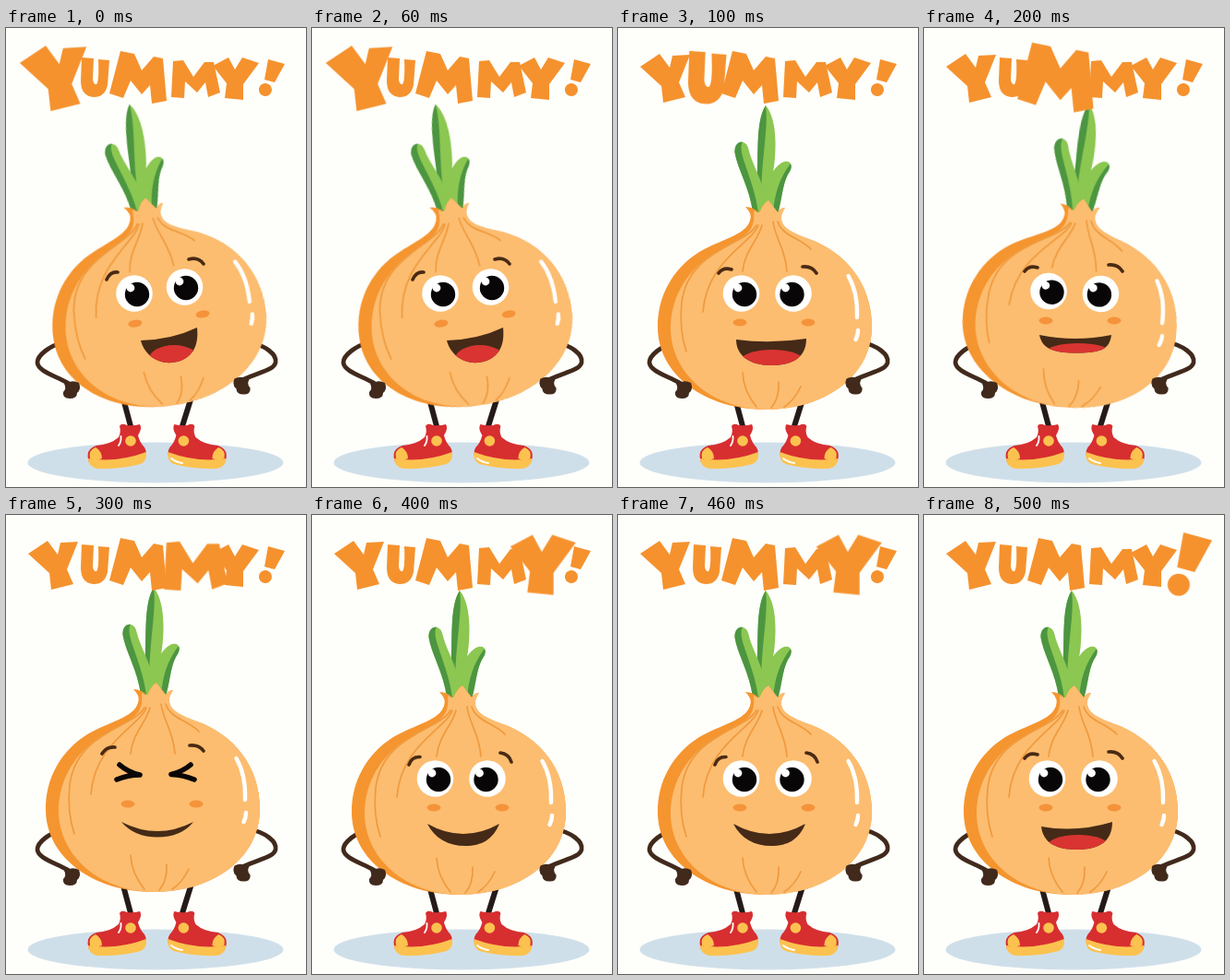
Recreate the animation shown at these times as an HTML page. Size 325 by 498 pixels, loop 0.6 s.

```html
<!DOCTYPE html>
<html lang="en">
<head>
<meta charset="utf-8">
<title>Yummy!</title>
<style>
  html, body { margin: 0; width: 100%; height: 100%; overflow: hidden; background: #fefefa; }
  svg { display: block; width: 100%; height: 100%; }

  .title { fill: #f5922e; }
  .title path { animation: pop 600ms step-end infinite; transform-origin: var(--o); }
  .face { visibility: hidden; animation: show 600ms step-end infinite; }
  .t1 { animation-delay: -500ms !important; }
  .t2 { animation-delay: -400ms !important; }
  .t3 { animation-delay: -300ms !important; }
  .t4 { animation-delay: -200ms !important; }
  .t5 { animation-delay: -100ms !important; }
  @keyframes pop { 0% { transform: scale(var(--s, 1.34)); } 16.66%, 100% { transform: none; } }
  @keyframes show { 0% { visibility: visible; } 16.66%, 100% { visibility: hidden; } }

  .onion { transform-origin: 160px 270px; animation: sway 600ms step-end infinite; }
  @keyframes sway {
    0% { transform: translateY(-1px) rotate(-8deg); }
    16.66% { transform: translateY(2px); }
    33.33% { transform: translateX(3px) rotate(4.8deg); }
    50% { transform: translateY(-3px); }
    66.66%, 100% { transform: none; }
  }

  .line { fill: none; stroke-linecap: round; stroke-linejoin: round; }
  .seam { stroke: #f09a3e; stroke-width: 1.7; }
  .shine { stroke: #fff; stroke-width: 4.4; }
  .limb { stroke: #412a1c; stroke-width: 4.8; }
  .leg { stroke: #241b19; stroke-width: 6; }
  .brow { stroke: #4a2a14; stroke-width: 3.6; }
  .shut { stroke: #0b0706; stroke-width: 5.6; }
  .mouth { fill: #452a17; }
  .tongue { fill: #d93431; }
  .cheek { fill: #f5933a; }
  .red { fill: #d72e30; }
  .yellow { fill: #fcc24f; }
  .light { fill: #8bc751; }
  .dark { fill: #4c9541; }
</style>
</head>
<body>
<svg viewBox="0 0 325 498" preserveAspectRatio="none" role="img" aria-label="YUMMY!">
  <defs>
    <circle id="eye" r="19.800" fill="#fff"/>
    <g id="pupil">
      <circle r="13.200" fill="#080606"/>
      <circle cx="-7" cy="-7" r="4.400" fill="#fff"/>
    </g>
    <g id="eyes">
      <use href="#eye" x="133.500" y="286"/>
      <use href="#pupil" x="137" y="287"/>
      <use href="#eye" x="190" y="286"/>
      <use href="#pupil" x="188.500" y="287"/>
    </g>
    <g id="cheeks" class="cheek">
      <ellipse cx="132" cy="317.500" rx="7.500" ry="4"/>
      <ellipse cx="206" cy="317.500" rx="7.500" ry="4"/>
    </g>
    <path id="brows" class="line brow" d="M109 264Q114 257 123 260M200 257Q210 256 215 264"/>
    <g id="shoe">
      <path class="red" d="M123 432Q125 428 131 431Q138 432 145 430Q148 434 143 442Q145 450 150 455Q153 460 151 466L90 471Q85 457 98 453Q113 452 122 444Q125 438 123 432Z"/>
      <path class="yellow" d="M89 467Q120 472 152 460Q153 470 146 473Q125 479 99 478Q89 476 89 467Z"/>
      <path class="yellow" d="M91 467Q89 458 97 455Q104 459 104 467Q97 470 91 467Z"/>
      <circle class="yellow" cx="135" cy="448" r="5.800"/>
    </g>
    <path id="hand" d="M63 386Q72 381 79 385Q82 392 77 396Q77 402 69 402Q61 402 62 395Q66 391 63 386Z"/>
    <path id="m0" d="M146 339Q180 338 207 325C209 344 203 357 186 362C166 367 150 355 146 339Z"/>
    <path id="m1" d="M128 338Q165 343 204 337C204 357 190 366 166 366C142 366 128 355 128 338Z"/>
    <path id="m2" d="M125 333Q164 341 203 333C201 348 193 352.500 165 352.500C138 352.500 128 347 125 333Z"/>
    <path id="m5" d="M127 338Q165 345 204 333C204 354 190 363 166 363C142 363 129 355 127 338Z"/>
    <clipPath id="c0"><use href="#m0"/></clipPath>
    <clipPath id="c1"><use href="#m1"/></clipPath>
    <clipPath id="c2"><use href="#m2"/></clipPath>
    <clipPath id="c5"><use href="#m5"/></clipPath>
  </defs>

  <rect width="325" height="498" fill="#fefefa"/>
  <ellipse cx="162" cy="471.500" rx="138.500" ry="22" fill="#cfdfea"/>

  <path class="line leg" d="M127 402L135 432M201 400L191 432"/>
  <use href="#shoe"/>
  <use href="#shoe" transform="matrix(-1 0 0 1 327.400 0)"/>
  <path class="line" stroke="#fff" stroke-width="1.800" d="M124.500 443Q125 449 122 453M179 467Q184 471 191 472"/>
  <path class="line limb" d="M62 341C47 345 34 355 34 363C35 372 50 376 67 385M264 341C280 344 294 354 292 363C290 371 276 373 258 381"/>

  <g class="onion">
    <!-- leaves -->
    <path class="light" d="M148 198C154 160 147 100 160 82C174 98 172 140 166 165L166 198Z"/>
    <path class="dark" d="M150 170C153 140 148 100 160 82C163 106 156 135 155 180Z"/>
    <path class="light" d="M146 198C143 172 129 150 126.500 133C126 121 138 118 141 128C145 145 154 158 158 176L162 198Z"/>
    <path class="dark" d="M146 198C143 172 129 150 126.500 133C126 125 130 121 135 121.500C128 133 147 160 152 198Z"/>
    <path class="light" d="M156 198C160 170 165 149 180 143C189 141 189 149 184 157C178 169 178 182 173 200Z"/>
    <path class="dark" d="M168 198C170 178 174 162 187 145C189 149 187 153 184 157C178 169 178 182 173 200Z"/>
    <!-- bulb -->
    <path fill="#f5952f" d="M138 192Q146 200 143 207C138 223 112 227 88 241C58 260 43 290 43 322C43 375 95 412 160 412C225 412 275 375 275 322C275 275 246 241 207 227C190 221 178 215 177 206Q176 200 181 193Q176 193 173 198L163 185Q157 188 153 199Q147 192 138 192Z"/>
    <path fill="#fcbd70" d="M147 196Q148 205 146 211C141 227 118 233 100 245C70 266 57 295 57 325C58 372 100 411 160 412C225 412 275 375 275 322C275 275 246 241 207 227C190 221 178 215 177 206Q176 200 181 193Q176 193 173 198L163 185Q157 188 153 199Z"/>
    <path class="line seam" d="M150 212C138 234 76 238 69 296Q66 325 74 349M152 212C145 232 96 250 92 306M156 212C152 228 137 240 135 262M168 208C170 226 181 236 183 262M173 208C178 224 198 226 209 238M135 372Q136 392 150 409M174 382Q175 400 166 410M198 387Q191 402 180 409"/>
    <path class="line shine" d="M249.500 267Q260 285 259 312M260 326Q260 331 257.500 336"/>
  </g>

  <g fill="#412a1c">
    <use href="#hand"/>
    <use href="#hand" transform="matrix(-1 0 0 1 326.500 -4.500)"/>
  </g>

  <!-- expressions -->
  <g class="face">
    <use href="#eye" x="139" y="288"/>
    <use href="#pupil" x="142" y="289"/>
    <use href="#eye" x="193.500" y="281"/>
    <use href="#pupil" x="195" y="282"/>
    <use href="#cheeks" transform="translate(7.500 -2) rotate(-8 169 317.500)"/>
    <path class="line brow" d="M109 273Q113 264 121 265M198 251Q208 248 214 256"/>
    <use href="#m0" class="mouth"/>
    <ellipse class="tongue" clip-path="url(#c0)" cx="182" cy="359" rx="27" ry="15"/>
  </g>
  <g class="face t1">
    <use href="#eyes" y="2"/>
    <use href="#cheeks" y="2"/>
    <use href="#brows" y="2"/>
    <use href="#m1" class="mouth"/>
    <ellipse class="tongue" clip-path="url(#c1)" cx="167" cy="363" rx="36" ry="14"/>
  </g>
  <g class="face t2">
    <use href="#eyes" transform="translate(1.500 1) rotate(3 162 286)"/>
    <use href="#cheeks"/>
    <use href="#brows"/>
    <use href="#m2" class="mouth"/>
    <ellipse class="tongue" clip-path="url(#c2)" cx="167" cy="351" rx="34" ry="9"/>
  </g>
  <g class="face t3">
    <path class="line shut" d="M123 271Q132 279 145 282Q132 282 120 287M200 271Q192 278 179 281.500Q192 282 204 287"/>
    <use href="#cheeks" y="-4"/>
    <path class="line brow" d="M104 259Q109 251 118 252M199 250Q209 249 214 256"/>
    <path class="mouth" d="M125 333Q164 353 203 333Q190 349.500 164 349.500Q139 349.500 125 333Z"/>
  </g>
  <g class="face t4">
    <use href="#eyes"/>
    <use href="#cheeks"/>
    <path class="line brow" d="M105 271Q108 262 117 262.500M204 258Q213 259 216 268"/>
    <path class="mouth" d="M125 335Q164 357 203 335C196 352 184 359 166 359C148 359 133 351 125 335Z"/>
  </g>
  <g class="face t5">
    <use href="#eyes"/>
    <use href="#cheeks"/>
    <use href="#brows"/>
    <use href="#m5" class="mouth"/>
    <ellipse class="tongue" clip-path="url(#c5)" cx="167" cy="361" rx="35" ry="14"/>
  </g>

  <!-- cut-out lettering -->
  <g class="title">
    <path style="--o:51px 54px" d="M24 42L45 28L56 43L59 30L78 29L66 59L73 75L49 81L47 63Z"/>
    <path class="t1" style="--o:96px 53px" d="M82 32L95 33L94 56Q95 62 98 61Q101 58 100 34L112 35L110 62Q107 75 95 75Q81 74 81 57Z"/>
    <path class="t2" style="--o:145px 53px;--s:1.33" d="M112 71L124 25L139 28L147 46L160 31L170 33L174 79L158 82L156 62L147 72L135 57L127 76Z"/>
    <path class="t3" style="--o:205px 56px;--s:1.3" d="M179 75L181 36L192 35L203 53L215 37L225 37L232 70L219 75L216 59L207 70L194 58L193 76Z"/>
    <path class="t4" style="--o:246px 57px;--s:1.42" d="M224 41L241 32L248 45L256 32L274 38L257 61L257 78L237 76L239 60Z"/>
    <path class="t5" style="--o:288px 55px;--s:1.72" d="M284 34L302 39L291 59L280 56ZM281 60A7 7 0 1 1 280.900 60Z"/>
  </g>
</svg>
</body>
</html>
```
